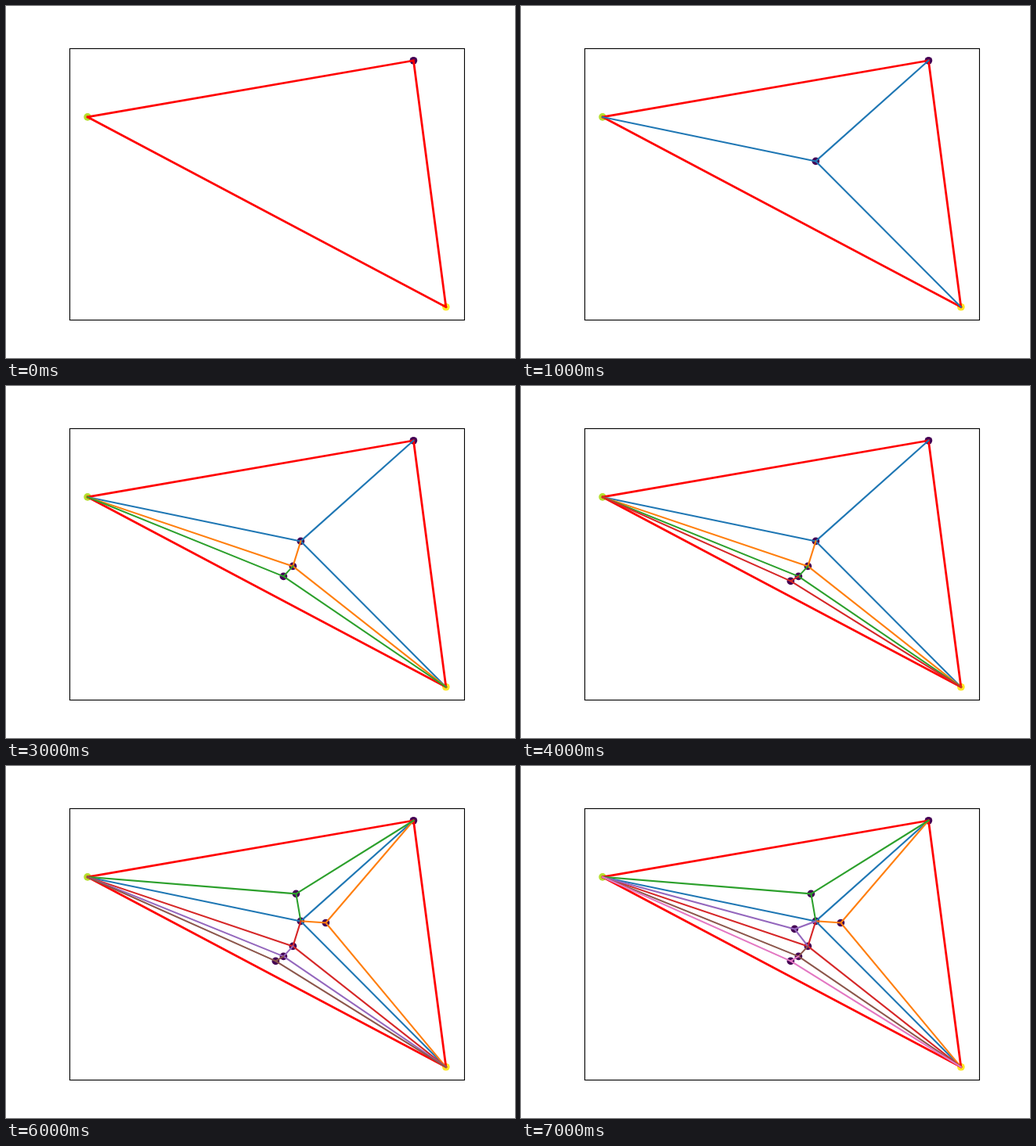
Recreate the animation shown at these times as an HTML page with a canvas. Size 650 by 450 pixels, loop 8000 ms.

```html
<!DOCTYPE html>
<html lang="en">
<head>
<meta charset="utf-8">
<title>Triangle subdivision</title>
<style>
  html, body { margin: 0; width: 100%; height: 100%; overflow: hidden; background: #fff; }
  canvas { display: block; }
</style>
</head>
<body>
<canvas id="stage" width="650" height="450"></canvas>
<script>
const ctx = document.getElementById('stage').getContext('2d');
const STEP = 1000, STEPS = 8;
const PALETTE = ['#1f77b4', '#ff7f0e', '#2ca02c', '#d62728', '#9467bd', '#8c564b', '#e377c2'];
const DARK = '#440154';

const points = {
  left:   [104.15, 141.9],
  top:    [520.4, 69.75],
  bottom: [561.85, 384.75],
  centre: [376.4, 198.4],
  east:   [408.4, 200.5],
  north:  [370.4, 163.4],
  south:  [366.4, 230.4],
  west:   [349.4, 208.4],
  low:    [354.4, 243.4],
  lowest: [344.4, 249.4]
};

// Depth-first order of the subdivision: [point, step it appears, corners of its triangle]
const splits = [
  ['centre', 1, ['left', 'top', 'bottom']],
  ['east',   6, ['top', 'bottom', 'centre']],
  ['north',  5, ['left', 'top', 'centre']],
  ['south',  2, ['left', 'bottom', 'centre']],
  ['west',   7, ['left', 'centre', 'south']],
  ['low',    3, ['left', 'bottom', 'south']],
  ['lowest', 4, ['left', 'bottom', 'low']]
];

function dot(name, color) {
  ctx.fillStyle = color;
  ctx.beginPath();
  ctx.arc(...points[name], 4.86, 0, Math.PI * 2);
  ctx.fill();
}

function lines(pairs, color, width) {
  ctx.strokeStyle = color;
  ctx.lineWidth = width;
  ctx.lineCap = 'square';
  ctx.lineJoin = 'round';
  ctx.beginPath();
  for (const [a, b] of pairs) {
    ctx.moveTo(...points[a]);
    ctx.lineTo(...points[b]);
  }
  ctx.stroke();
}

function draw(step) {
  const shown = splits.filter(([, birth]) => birth <= step);
  ctx.fillStyle = '#fff';
  ctx.fillRect(0, 0, 650, 450);

  dot('left', '#b5de2b');
  dot('top', DARK);
  dot('bottom', '#fde725');
  shown.forEach(([name]) => dot(name, DARK));

  lines([['left', 'top'], ['top', 'bottom'], ['bottom', 'left']], '#f00', 2.78);
  shown.forEach(([name, , corners], i) =>
    lines(corners.map(corner => [corner, name]), PALETTE[i], 2.08));

  ctx.strokeStyle = '#000';
  ctx.lineWidth = 1.11;
  ctx.lineJoin = 'miter';
  ctx.strokeRect(81.5, 54.5, 504, 347);
}

const start = performance.now();
let current = -1;
function tick() {
  const step = Math.floor((performance.now() - start) / STEP) % STEPS;
  if (step !== current) draw(current = step);
  requestAnimationFrame(tick);
}
tick();
</script>
</body>
</html>
```
